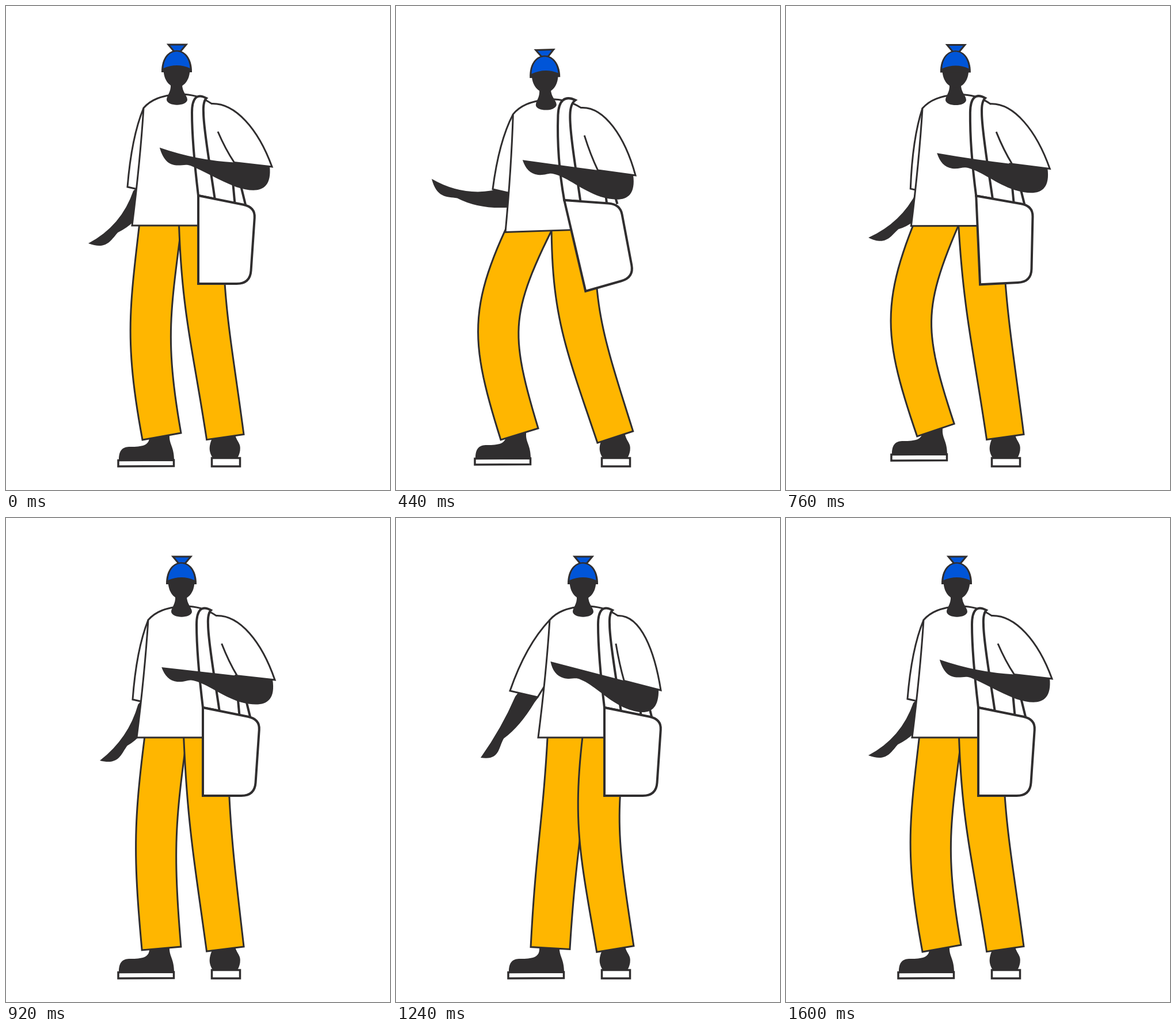
These frames come from a looping animation (667x840 px, 2080 ms). An HTML page with a canvas:

```html
<!DOCTYPE html>
<html lang="en">
<head>
<meta charset="utf-8">
<title>Walking figure</title>
<style>
  html, body { margin: 0; width: 100%; height: 100%; overflow: hidden; background: #fff; }
  canvas { display: block; }
</style>
</head>
<body>
<canvas id="stage" width="667" height="840"></canvas>
<script>
const ctx = document.getElementById('stage').getContext('2d');
const INK = '#302e2f', ORANGE = '#ffb600', BLUE = '#0055d8', WHITE = '#fff';
const LOOP = 2080, STEP = 40;
const TIMES = [0, 160, 440, 600, 920, 1240, 1600];

// One value per key time; the last key repeats the first.
const TRACKS = {
  sway: [0, -11, -29, -12.5, 8, 28],
  swing: [0, .48, 1, .54, 0, 0],
  hipL: [270, 256, 237, 252, 279.5, 300.5],
  thighL: [251, 165.5, 160.7, 155, 258, 291.7],
  shinL: [239.5, 177, 163.5, 162, 255, 277.5],
  ankleX: [270.5, 256.5, 214.5, 240.5, 270, 268],
  ankleY: [747, 728, 743, 725, 747, 746.5],
  shoeX: [0, -18, -58, -34, 0, 0],
  shoeY: [0, -17, -3, -20, 0, 0],
  hipR: [338, 327, 308, 326, 346, 364],
  thighR: [341, 332, 306.5, 330, 351, 342],
  shinR: [356, 352, 326, 352, 359, 353],
  elbowX: [462, 445, 416, 441, 467, 460],
  elbowY: [279, 285, 294, 286, 281, 299],
  armTilt: [9.65, 9, 7.8, 9.4, 6.4, 14.6],
  wristBend: [7, 3, 0, 3, 0, 0],
  cuffX: [211, 211, 168, 207, 220, 198],
  cuffY: [314, 318, 318, 318, 315, 300],
  handX: [143, 112, 62, 106, 163, 147],
  handY: [412, 369, 300, 363, 421, 416],
  armBend: [8, 7, 10, 7, 6, 0]
};

// Monotone cubic interpolation, at rest at both ends.
function valueAt(track, t) {
  const v = [...track, track[0]];
  const slope = i => (v[i + 1] - v[i]) / (TIMES[i + 1] - TIMES[i]);
  const tangent = i => {
    if (i === 0 || i === v.length - 1) return 0;
    const a = slope(i - 1), b = slope(i);
    return a * b > 0 ? 2 * a * b / (a + b) : 0;
  };
  let i = 0;
  while (i < TIMES.length - 2 && t >= TIMES[i + 1]) i++;
  const span = TIMES[i + 1] - TIMES[i], s = (t - TIMES[i]) / span, r = 1 - s;
  return v[i] * r * r * (1 + 2 * s) + v[i + 1] * s * s * (3 - 2 * s)
    + span * s * r * (tangent(i) * r - tangent(i + 1) * s);
}

const add = (p, x, y) => [p[0] + x, p[1] + y];
const mix = (p, q, f) => [p[0] + (q[0] - p[0]) * f, p[1] + (q[1] - p[1]) * f];
const frame = (o, angle) => (u, v) => [
  o[0] + u * Math.cos(angle) - v * Math.sin(angle),
  o[1] + u * Math.sin(angle) + v * Math.cos(angle)
];

function draw(d, fill, width) {
  const path = new Path2D(d);
  if (fill) { ctx.fillStyle = fill; ctx.fill(path); }
  if (width) { ctx.lineWidth = width; ctx.strokeStyle = INK; ctx.stroke(path); }
}

// Trouser leg: a slightly tapered band along a cubic spine.
function leg(hip, thighX, shinX, ankle, hipHalf, ankleHalf) {
  const h = ankle[1] - hip[1], n = 28, left = [], right = [];
  const c1 = [thighX, hip[1] + .42 * h], c2 = [shinX, ankle[1] - .45 * h];
  for (let i = 0; i <= n; i++) {
    const f = i / n, half = hipHalf + (ankleHalf - hipHalf) * f;
    const a = mix(hip, c1, f), b = mix(c1, c2, f), c = mix(c2, ankle, f);
    const p = mix(a, b, f), q = mix(b, c, f);
    const side = frame(mix(p, q, f), Math.atan2(q[1] - p[1], q[0] - p[0]));
    left.push(side(0, half));
    right.unshift(side(0, -half));
  }
  draw(`M${left.join('L')}L${right.join('L')}Z`, ORANGE, 3);
}

function shoes(x, y) {
  ctx.save();
  ctx.translate(x, y);
  draw('M196 788C196 770 203 765 216 765C236 765 249 763 249 748V725H284V745C283 760 292 765 292 788Z', INK);
  draw('M195 788.5L291.5 788L291.5 798.5L195 799Z', WHITE, 3.5);
  ctx.restore();
  draw('M359 784C350 770 354 760 360 745L397 738C399 757 409 757 406.5 772Q405 780 402 784Z', INK);
  draw('M357.5 784.5H406.500V799H357.5Z', WHITE, 3.5);
}

function backArm(p, shoulder) {
  const cuff = [p.cuffX, p.cuffY], elbow = add(cuff, 26, 14), b = p.armBend;
  const dx = p.handX - elbow[0], dy = p.handY - elbow[1], len = Math.hypot(dx, dy);
  const place = frame(elbow, Math.atan2(dy, dx)), a = (u, v) => place(u, -v);
  draw(`M${a(-16, 17)}L${a(-5, 17)}Q${a(44, 22 + b)} ${a(len - 51, 12 + b)}
    C${a(len - 32, 14 + b)} ${a(len - 16, 30)} ${a(len, 0)}
    Q${a(len * .5, 2.2 * b - 2)} ${a(7, -16)}L${a(-8, -16)}Z`, INK);
  const bulge = add(mix(shoulder, cuff, .5), -7, -18);
  draw(`M${shoulder}Q${bulge} ${cuff}L${add(cuff, 48, 11)}L${add(shoulder, 0, 100)}`, WHITE, 3);
}

function frontArm(p, at) {
  const elbow = [p.elbowX, p.elbowY], b = p.wristBend;
  const a = frame(elbow, p.armTilt * Math.PI / 180);
  const hem = a(-66, .5 * b);
  draw(`M${a(-198, 0)}C${a(-191, 14)} ${a(-182, 22 + .5 * b)} ${a(-168, 22 + .5 * b)}
    C${a(-155, 22 + .5 * b)} ${a(-150, 15 + .7 * b)} ${a(-140, 17 + .7 * b)}
    C${a(-115, 20 + b)} ${a(-90, 38)} ${a(-55, 45)}
    C${a(-20, 50)} ${a(8, 44)} ${a(-4, 0)}L${hem}Q${a(-130, 1.6 * b)} ${a(-198, 0)}Z`, INK);
  const pull = elbow[0] - at(462, 279)[0];
  const armpit = add(at(368, 218), .47 * pull, 0);
  draw(`M${at(357, 169.5)}C${at(398, 168)} ${add(elbow, -24 - .45 * pull, -66)} ${elbow}
    L${hem}Q${add(mix(armpit, hem, .5), -1, 4)} ${armpit}`, WHITE, 3);
}

function bagParts(k, at) {
  const tl = at(334 - 11 * k, 329);
  const tr = add(tl, 99 - 2 * k, 20 - 13 * k);
  const br = add(tl, 90 + 31 * k, 153 - 19 * k);
  const bl = add(tl, 37 * k, 153 + 5 * k);
  const top = (x, y) => at(x, y - 4 * k);
  const rim = mix(tl, tr, .29);
  return {
    straps() {
      draw(`M${at(391, 272)}L${mix(tl, tr, .64 + .12 * k)}
        M${at(402, 288)}L${mix(tl, tr, .83 + .12 * k)}`, null, 4);
      draw(`M${tl}C${add(tl, -6 - 3 * k, -50)} ${top(323 - 9 * k, 230)} ${top(323 - 6 * k, 185)}
        C${top(323 - 4 * k, 159)} ${top(332 - 2 * k, 151)} ${top(348, 160)}
        Q${top(342 - 3 * k, 166)} ${top(343 - 5 * k, 185)}
        C${top(343 - 7 * k, 215)} ${add(rim, -7, -50)} ${rim}Z`, WHITE, 4);
    },
    pouch() {
      draw(`M${tl}L${mix(tl, tr, .79)}Q${tr} ${mix(tr, br, .14)}
        L${mix(tr, br, .83)}Q${br} ${mix(br, bl, .26)}L${bl}Z`, WHITE, 4);
    }
  };
}

function shirt() {
  const edge = 'M342 381H219Q233 270 239 177C252 162 270 156 297 153C322 152 340 158 358 170';
  draw(edge + 'L375 220Z', WHITE);
  draw(edge, null, 3);
}

function head() {
  draw('M286 136C287 150 279 155 279 163C281 174.5 313 174.5 315 163C315 155 306 150 306 136Z', INK);
  draw('M273.5 108C273 152 320 152 319.5 108Z', INK);
  draw('M282 67H313L303 79H292Z', BLUE, 3);
  draw('M270 115C269 64 324 64 323 115Z', INK);
  draw('M273.5 108C276 69.5 317 69.5 319.5 108Q297 98 273.5 108Z', BLUE);
}

function render(now) {
  const t = Math.min(Math.floor(now % LOOP / STEP) * STEP, 1600);
  const p = {};
  for (const name in TRACKS) p[name] = valueAt(TRACKS[name], t);

  // Leaning left also lowers and tilts the torso.
  const lean = Math.min(0, p.sway), drop = -.33 * lean, tilt = lean * .00113;
  const torso = frame([275 + p.sway, 381 + drop], tilt);
  const at = (x, y) => torso(x - 275, y - 381);
  const inTorso = paint => {
    ctx.save();
    ctx.translate(275 + p.sway, 381 + drop);
    ctx.rotate(tilt);
    ctx.translate(-275, -381);
    paint();
    ctx.restore();
  };
  const bag = bagParts(p.swing, at);

  ctx.fillStyle = WHITE;
  ctx.fillRect(0, 0, 667, 840);
  shoes(p.shoeX, p.shoeY);
  backArm(p, at(239, 177));
  leg([p.hipL, 365 + drop], p.thighL, p.shinL, [p.ankleX, p.ankleY], 36.5, 34);
  leg([p.hipR, 365 + drop], p.thighR, p.shinR, [380.8, 748], 38, 32.5);
  inTorso(shirt);
  inTorso(head);
  bag.straps();
  frontArm(p, at);
  bag.pouch();
}

function tick() {
  render(performance.now());
  requestAnimationFrame(tick);
}
tick();
</script>
</body>
</html>
```
